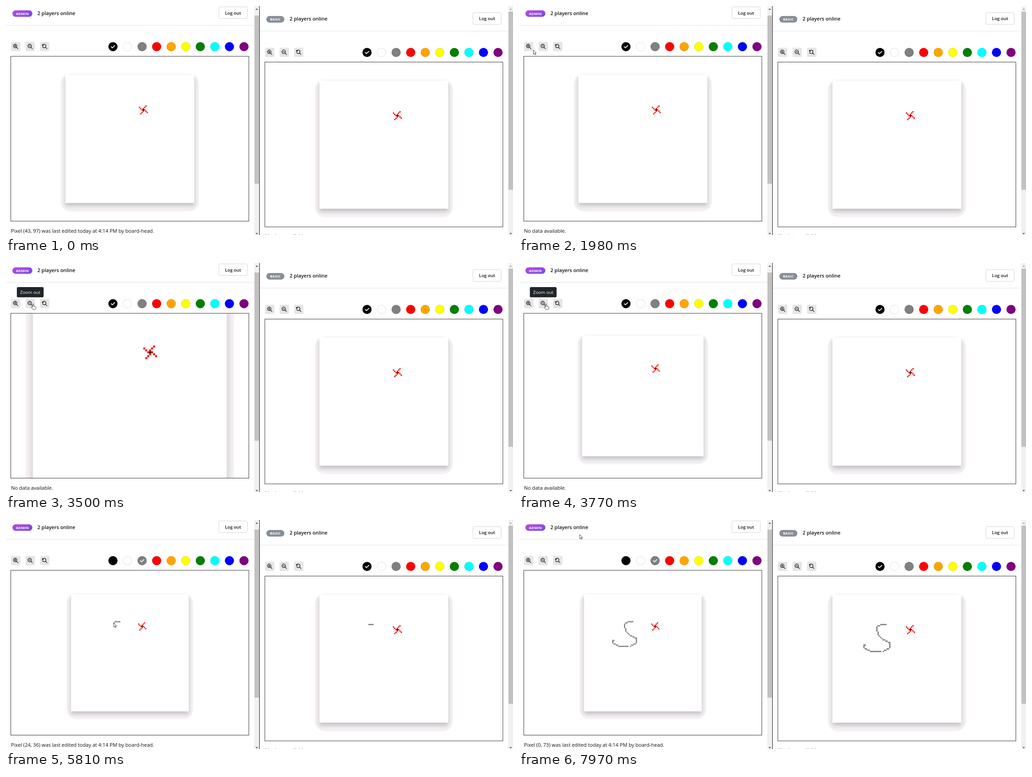
These frames come from a looping animation (1111 px wide and 504 px high, 8000 ms). An HTML page:

```html
<!DOCTYPE html>
<html lang="en">
<head>
<meta charset="utf-8">
<title>Shared pixel board</title>
<style>
  html, body { margin: 0; width: 100%; height: 100%; overflow: hidden; background: #fff; }
  svg { display: block; }
  #stage { width: 1111px; height: 504px; font: 11.05px "Open Sans", "Noto Sans", sans-serif; fill: #111; }
  .semi { font-weight: 600; }
  .badge { font-size: 7.8px; font-weight: 700; letter-spacing: .18px; fill: #fff; text-anchor: middle; }
  .icon, .check { fill: none; stroke: #111; stroke-width: 2.3; stroke-linecap: round; stroke-linejoin: round; }
  .check { stroke: #fff; stroke-width: 1.7; }
  .board { fill: #fff; filter: drop-shadow(0 6px 5px rgba(30, 45, 45, .25)); }
  .tip { opacity: 0; font-size: 9.8px; }
  .tip rect { fill: #212529; }
  .tip text { fill: #fff; text-anchor: middle; }

  .left .zoom { animation: zoom 8s infinite; }
  .left .c0 { animation: check 8s step-end infinite reverse; }
  .left .c0 { animation: uncheck 8s step-end infinite; }
  .left .c2 { animation: check 8s step-end infinite; }
  .c2 { opacity: 0; }
  .tip-in { animation: tipIn 8s linear infinite; }
  .tip-out { animation: tipOut 8s linear infinite; }

  @keyframes zoom {
    0%, 29.4% { transform: scale(1); animation-timing-function: ease-out; }
    30.8% { transform: scale(1.505); animation-timing-function: ease-out; }
    33.5%, 40% { transform: scale(2.48); animation-timing-function: ease-out; }
    43%, 45% { transform: scale(1.505); animation-timing-function: ease-out; }
    47.6%, 100% { transform: scale(.913); }
  }
  @keyframes check { 0% { opacity: 0; } 58.75%, 100% { opacity: 1; } }
  @keyframes uncheck { 0% { opacity: 1; } 58.75%, 100% { opacity: 0; } }
  @keyframes tipIn { 0%, 26.9% { opacity: 0; } 28.1%, 36.6% { opacity: 1; } 37.5%, 100% { opacity: 0; } }
  @keyframes tipOut { 0%, 37.2% { opacity: 0; } 37.9%, 50% { opacity: 1; } 51%, 100% { opacity: 0; } }
</style>
</head>
<body>
<svg id="stage" viewBox="0 0 1111 504">
  <defs>
    <linearGradient id="violet" x2="1" y2="1">
      <stop stop-color="#be4bdb"/><stop offset="1" stop-color="#7048e8"/>
    </linearGradient>
  </defs>
</svg>
<script>
const LOOP = 8000, SIZE = 282.4, CX = 271.3, CY = 292.2;
const stage = document.getElementById('stage');
const colors = ['black', 'white', 'gray', 'red', 'orange', 'yellow', 'green', 'cyan', 'blue', 'purple'];
const lens = 'M17 10A7 7 0 1 1 3 10A7 7 0 1 1 17 10M21 21l-6-6';
const icons = [
  lens + 'M7 10h6M10 7v6',
  lens + 'M7 10h6',
  'M21 21l-6-6M3.3 12A7 7 0 1 0 3.4 7.6M3 4v4h4'
];

const cells = list => list.map(([c, r]) => `M${c} ${r}h1v1h-1z`).join('');

// Pixels along a polyline
function trace(points) {
  const out = [points[0]];
  for (let i = 1; i < points.length; i++) {
    const [x0, y0] = points[i - 1], [x1, y1] = points[i];
    const n = Math.max(Math.abs(x1 - x0), Math.abs(y1 - y0));
    for (let k = 1; k <= n; k++)
      out.push([Math.round(x0 + (x1 - x0) * k / n), Math.round(y0 + (y1 - y0) * k / n)]);
  }
  return out;
}

// One diagonal arm, turned four times about the black pixel
const cross = [];
for (let k = 1; k <= 3; k++) {
  let x = -k, y = 1 - k;
  for (let turn = 0; turn < 4; turn++) {
    cross.push([60 + x, 27 + y]);
    [x, y] = [-y, x];
  }
}

const stroke = [
  ...trace([[41, 23], [37, 23], [34, 25], [34, 28], [35, 29], [35, 31], [38, 34], [44, 37], [44, 41], [39, 44]]),
  ...trace([[37, 44], [30, 44], [24, 41], [24, 39], [25, 39]])
];

function pane(side, x, y, badge, badgeX, badgeW, fill, titleX) {
  const tools = icons.map((d, i) => {
    const cx = 21.2 + 31.8 * i;
    return `<rect x="${cx - 10.2}" y="79" width="20.4" height="20.6" rx="2.8" fill="#e5e5e5"/>
      <path class="icon" transform="translate(${cx - 6.6} 82.6) scale(.55)" d="${d}"/>`;
  }).join('');
  const swatches = colors.map((c, i) => {
    const cx = 234.4 + 31.9 * i;
    return `<circle cx="${cx}" cy="89.5" r="10" fill="${c}"/>
      <circle cx="${cx}" cy="89.5" r="9.6" fill="none" stroke="#000" stroke-opacity=".13"/>` +
      (i === 0 || i === 2 ? `<path class="check c${i}" d="M${cx - 3.8} 89.7l2.6 2.5 5.1-5.1"/>` : '');
  }).join('');
  return `<g class="${side}" transform="translate(${x} ${y})">
    <rect x="${badgeX}" y="9.4" width="${badgeW}" height="14.4" rx="7.2" fill="${fill}"/>
    <text class="badge" x="${badgeX + badgeW / 2}" y="19.5">${badge}</text>
    <text class="semi" x="${titleX}" y="19.5" font-size="10.9">2 players online</text>
    <rect x="466.4" y="2" width="62.2" height="25.6" rx="2.8" fill="#fff" stroke="#ced4da"/>
    <text class="semi" x="497.5" y="18.8" font-size="9.75" text-anchor="middle">Log out</text>
    <path d="M-1 42.5H544" stroke="#dee2e6"/>
    ${tools}${swatches}
    <svg x="11" y="111" width="521" height="362" viewBox="${11 - CX} ${111 - CY} 521 362">
      <g class="zoom">
        <rect x="-151.4" y="-142.4" width="302.8" height="302.4" rx="23" fill="#f5f1f4"/>
        <rect class="board" x="${-SIZE / 2}" y="${-SIZE / 2}" width="${SIZE}" height="${SIZE}"/>
        <g transform="scale(${SIZE / 100}) translate(-50 -50)">
          <path d="${cells(cross)}" fill="red"/><path d="M60 27h1v1h-1z" fill="#000"/>
          <path class="ink" fill="gray"/>
        </g>
      </g>
    </svg>
    <rect x="10.5" y="110.7" width="521.6" height="362.8" fill="none" stroke="#333"/>
    <text class="status" x="11" y="498.7">No data available.</text>
  </g>`;
}

function scrollbar(x, top, bottom, upFill) {
  const mid = x + 5.5;
  return `<rect x="${x}" width="11" height="504" fill="#f1f1f1"/>
    <rect x="${x + .5}" y="${top}" width="10" height="${bottom - top}" fill="#c1c1c1"/>
    <path d="M${mid - 2.8} 8.2h5.6l-2.8-3z" fill="${upFill}"/>
    <path d="M${mid - 2.8} 499.8h5.6l-2.8 3z" fill="#505050"/>`;
}

function tooltip(name, x, width, label) {
  return `<g class="tip ${name}"><rect x="${x}" y="53" width="${width}" height="22.5" rx="2.8"/>
    <text x="${x + width / 2}" y="68.2">${label}</text></g>`;
}

stage.insertAdjacentHTML('beforeend',
  pane('left', 0, 0, 'ADMIN', 14, 43.8, 'url(#violet)', 68.8) +
  pane('right', 556.7, 12.7, 'BASIC', 13.8, 39.4, '#868e96', 64.9) +
  scrollbar(544, 21, 391, '#505050') + scrollbar(1100.5, 12.5, 404.5, '#a3a3a3') +
  '<path d="M555.5 0V504" stroke="#333" stroke-width="1.2"/>' +
  tooltip('tip-in', 4.8, 52.6, 'Zoom in') + tooltip('tip-out', 23.8, 58.6, 'Zoom out') +
  `<g id="cursor" fill="#fff" stroke="#333" stroke-width=".9" stroke-linejoin="round">
    <path id="arrow" d="M0 0V9.2l2.1-1.9 1.5 3.3 1.5-.7-1.5-3.2h2.8z"/>
    <path id="hand" d="M-1.2 1a1.2 1.2 0 0 1 2.4 0v4l3.6.8q1.4.3 1.3 1.8l-.5 2.6q-.4 2.3-2.6 2.3h-2.4q-1.2 0-1.9-1l-3-4.2q-.3-1.2 1-1.2l2.1 1.3z"/>
  </g>`);

const [leftInk, rightInk] = stage.querySelectorAll('.ink');
const status = stage.querySelector('.left .status');
const cursor = document.getElementById('cursor');
const arrow = document.getElementById('arrow');
const hand = document.getElementById('hand');

// Left board after zooming out
const unit = SIZE / 100 * .913, boardX = CX - 50 * unit, boardY = CY - 50 * unit;

// The hand speeds up along the S
const inkTime = i => 5540 + 1090 * (i / (stroke.length - 1)) ** .625;

// Cursor path: time, x, y
const path = [
  [250, 742, 480], [900, 484, 14], [1300, 421, 205], [1980, 31.5, 97],
  [2120, 31.5, 97], [2200, 24, 90], [2840, 24, 90], [2900, 36.5, 90.5],
  [3020, 59.5, 90], [4000, 59.5, 90], [4550, 301, 92], [4920, 294.5, 96], [5400, 262, 195],
  ...stroke.map(([c, r], i) => [inkTime(i), boardX + (c + .5) * unit, boardY + (r + .5) * unit]),
  [6690, 221.7, 253.9], [6960, 236, 240], [7230, 236, 240],
  [7660, 331.8, 163.8], [7970, 133, 32], [LOOP, 133, 32]
];

function cursorAt(t) {
  const i = Math.max(1, path.findIndex(p => p[0] >= t));
  const [t0, x0, y0] = path[i - 1], [t1, x1, y1] = path[i];
  const k = Math.max(0, (t - t0) / (t1 - t0));
  return [x0 + (x1 - x0) * k, y0 + (y1 - y0) * k];
}

const edited = (row, col) =>
  `Pixel (${row}, ${col}) was last edited today at 4:14 PM by board-head.`;

function statusAt(t) {
  if (t < 1300) return edited(43, 97);
  if (t < 5270) return 'No data available.';
  const [x, y] = cursorAt(Math.min(t, 7660));
  return edited(Math.max(0, Math.floor((y - boardY) / unit)), Math.floor((x - boardX) / unit));
}

const inkAt = t => cells(stroke.filter((_, i) => inkTime(i) <= t));
const within = (t, a, b) => t >= a && t < b;
const show = (el, on) => el.setAttribute('visibility', on ? 'visible' : 'hidden');

let start;
function draw(now) {
  start ??= now;
  const t = (now - start) % LOOP;
  const [x, y] = cursorAt(t);
  const pointing = within(t, 2160, 2860) || within(t, 2990, 4030);
  cursor.setAttribute('transform', `translate(${x.toFixed(1)} ${y.toFixed(1)})`);
  show(arrow, t >= 250 && !pointing);
  show(hand, pointing);
  leftInk.setAttribute('d', inkAt(t));
  rightInk.setAttribute('d', inkAt(t - 40));
  const text = statusAt(t);
  if (status.textContent !== text) status.textContent = text;
  requestAnimationFrame(draw);
}
requestAnimationFrame(draw);
</script>
</body>
</html>
```
